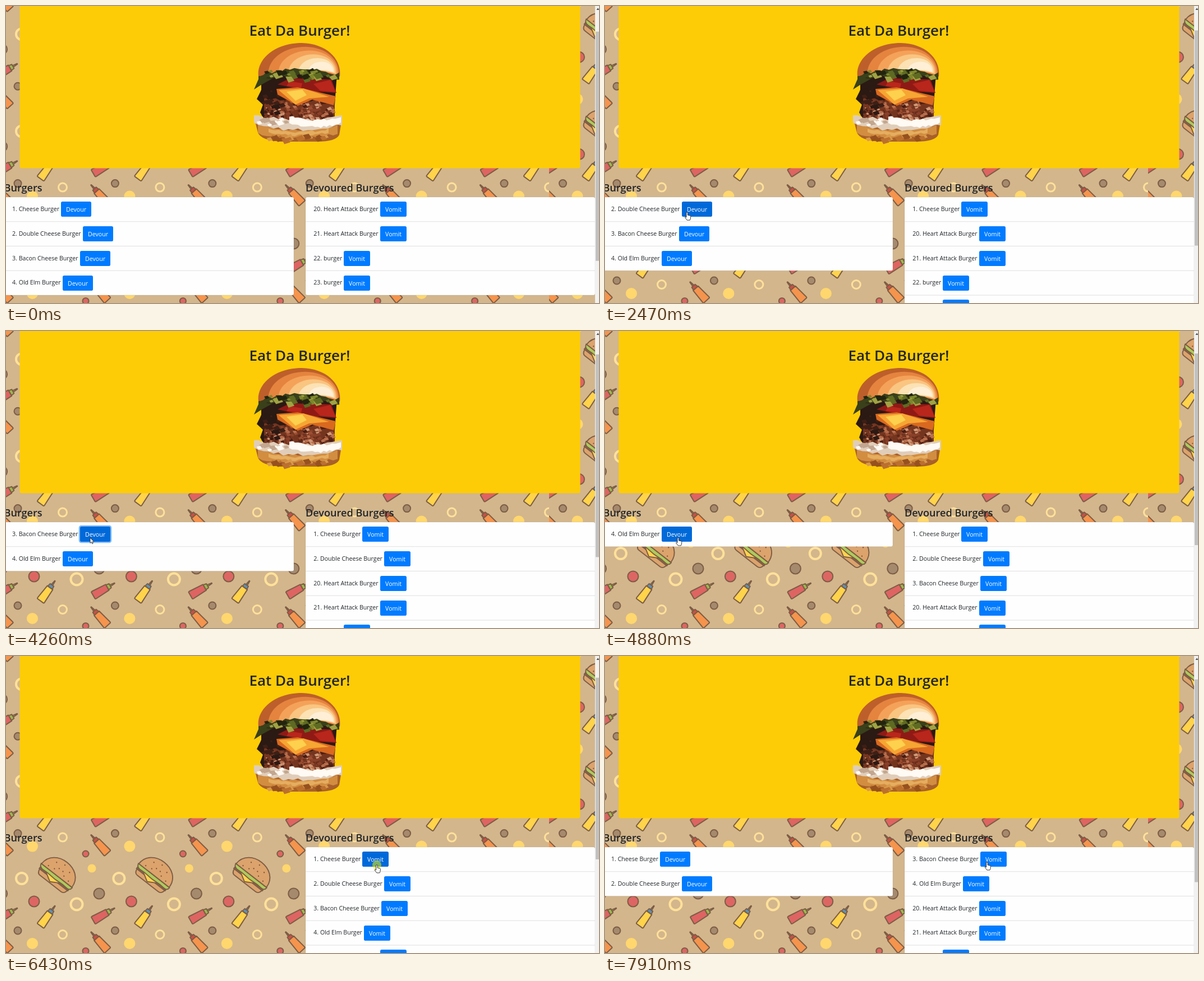
Animation, 1057 px wide and 530 px high, one loop 7.99 s. Source, as an HTML page:

```html
<!DOCTYPE html>
<html lang="en">
<head>
<meta charset="utf-8">
<title>Eat Da Burger!</title>
<style>
html, body { margin: 0; width: 100%; height: 100%; overflow: hidden; background: #d3b68c; }
svg { display: block; }
text { font: 10.6px "Open Sans", "Noto Sans", sans-serif; fill: #212529; }
.title { font-size: 26px; font-weight: 600; text-anchor: middle; }
.heading { font-size: 18.1px; font-weight: 600; }
.label { fill: #fff; text-anchor: middle; }
.ink { stroke: #7c5d45; stroke-width: 2; stroke-linejoin: round; }
.list { fill: #fefefe; stroke: #000; stroke-opacity: .125; stroke-width: .7; }
.rule { stroke: #dfdfdf; }
</style>
</head>
<body>
<svg width="1057" height="530" viewBox="0 0 1057 530">
  <defs>
    <clipPath id="before"><path d="M0 0H968V530H0Z"/></clipPath>
    <clipPath id="after"><path d="M968 0H1057V530H968Z"/></clipPath>
    <g id="tile"></g>
    <g id="wall"></g>
  </defs>
  <g clip-path="url(#before)"><use href="#wall"/></g>
  <g clip-path="url(#after)"><use href="#wall" x="971.5"/></g>

  <rect x="24.5" y="-9" width="999" height="298.5" rx="3.5" fill="#fdcc06"/>
  <text class="title" x="523.5" y="53">Eat Da Burger!</text>
  <g id="hero"></g>

  <text class="heading" x="-3.5" y="331">Burgers</text>
  <text class="heading" x="534" y="331">Devoured Burgers</text>
  <g id="lists"></g>

  <path fill="#f1f1f1" d="M1050 0H1057V530H1050Z"/>
  <path fill="#505050" d="M1052.5 7L1055 3.5 1057.500 7Z"/>
  <rect id="thumb" x="1051" width="6" fill="#c1c1c1"/>

  <g id="pointer">
    <circle id="press" r="8" fill="#e8f000" opacity=".55"/>
    <path id="arrow" fill="#fff" stroke="#222" stroke-width=".8" d="M0 0V9.5L2.2 7.5 3.7 10.8 5.2 10.1 3.8 7H6.8Z"/>
    <path id="hand" fill="#fff" stroke="#222" stroke-width=".9" d="M-1.4 7V1a1.3 1.3 0 0 1 2.6 0V5l4 .9q1.400.4 1.300 1.800l-.6 4-1 2.300h-5l-4-5.200q.5-1.800 2.700.2Z"/>
  </g>
</svg>
<script>
const $ = id => document.getElementById(id);
const LOOP = 7990, STEP = 80, TILE = 173.4;
const repeat = (n, draw) => Array.from({ length: n }, (_, i) => draw(i)).join('');

let seed = 7;
const random = (from, to) => from + (to - from) * (seed = seed * 16807 % 2147483647) / 2147483647;

// Wallpaper
const disc = (x, y, r, fill, ink = '') => `<circle cx="${x}" cy="${y}" r="${r}" fill="${fill}" class="${ink}"/>`;
const ring = (x, y, r, w) => `<circle cx="${x}" cy="${y}" r="${r}" fill="none" stroke="#ffe19a" stroke-width="${w}"/>`;
const bottle = (x, y, angle, body, cap) => `<g class="ink" transform="translate(${x} ${y}) rotate(${angle})">
  <path fill="${cap}" d="M-1.500 -17L-.5 -26H.5L1.500 -17ZM-5 -11L-4 -17H4L5 -11Z"/>
  <path fill="${body}" d="M-6 -11H6L7.500 16Q7.500 18 6 18H-6Q-7.500 18 -7.500 16Z"/></g>`;
const sesame = repeat(9, i => {
  const angle = Math.PI * (i + .5) / 9, r = i % 2 ? 13 : 24;
  return disc(-r * Math.cos(angle), -r * Math.sin(angle), 1.2, '#80553a');
});
const snack = `<g transform="translate(91 391) rotate(38) scale(.95)"><g class="ink">
  <path fill="#dca36c" d="M-33 10H33Q32 20 25 20H-25Q-32 20 -33 10Z"/>
  <path fill="#8d6048" d="M-34 6H34V11H-34Z"/>
  <path fill="#ffd34e" d="M-22 7H16L-3 18Z"/>
  <path fill="#aecb5b" d="M-37 1H37Q37 9 28 8T10 8 -8 8 -26 8 -37 1Z"/>
  <path fill="#dca36c" d="M-36 1C-36 -41 36 -41 36 1Z"/></g>${sesame}</g>`;

$('tile').innerHTML = snack +
  disc(142, 353, 5.5, '#dd6663', 'ink') + disc(153, 379, 7.5, '#ffd76e') + ring(28, 397, 10, 4) +
  disc(166, 424, 9.5, '#a58a6e', 'ink') + disc(50, 438, 9.5, '#dd6663', 'ink') + ring(126, 443, 10.5, 4) +
  bottle(171, 463, 60, '#de6462', '#9cba4d') + bottle(72, 467, 36, '#ffd34a', '#5b93b9') +
  disc(21, 490, 6.5, '#a58a6e', 'ink') + ring(101, 497, 7.5, 3) + disc(47, 513, 10, '#ffd76e') +
  bottle(169, 512, -42, '#f5944d', '#cf4f47');
$('wall').innerHTML = repeat(35, i =>
  `<use href="#tile" x="${(i % 7 - 1) * TILE}" y="${(Math.floor(i / 7) - 3) * TILE}"/>`);

// Large burger, built from ragged bands and random flecks
function band(left, right, top, bottom, bow, rough, fill) {
  const n = 18;
  const edge = y => i => `${left + (right - left) * i / n} ${y + bow * Math.sin(Math.PI * i / n) + random(-rough, rough)}`;
  const indexes = [...Array(n + 1).keys()];
  return `<path fill="${fill}" d="M${[...indexes.map(edge(top)), ...indexes.reverse().map(edge(bottom))].join('L')}Z"/>`;
}
const flecks = (count, left, right, top, bottom, size, tones) => repeat(count, i => {
  const s = random(size / 3, size);
  return `<path fill="${tones[i % tones.length]}" d="M${random(left, right)} ${random(top, bottom)}l${s} ${-s * random(0, .5)} ${s * .5} ${s * .7} ${-s} ${s * .3}Z"/>`;
});
const bun = ['#bd5f2a', '#e5843f', '#f4a25a', '#f9c581', '#fce2b4', '#feefd6'].map((fill, i) => {
  const scale = 1 - i * .14;
  return `<path fill="${fill}" transform="translate(578 114) scale(${scale}) translate(-578 -114)"
    d="M450 126C446 96 478 66 527 66C575 67 599 98 595 126Q520 102 450 126Z"/>`;
}).join('');

$('hero').innerHTML =
  '<path fill="#2b1913" d="M455 120H590L584 204 462 204 453 190 458 176 447 166 455 150Z"/>' +
  bun +
  band(460, 586, 164, 202, 5, 3, '#74351f') +
  flecks(150, 462, 578, 168, 200, 7, ['#9b4e32', '#4a1d13', '#b86e4c', '#5a2616', '#8a4029', '#d09a78']) +
  flecks(30, 454, 486, 145, 195, 9, ['#2b1913', '#3d1f15']) +
  '<path fill="#8f1a15" d="M484 140L506 129 580 131 589 155 540 152Z"/>' +
  '<path fill="#b9261b" d="M548 139L578 132 588 154 560 151ZM505 134L528 138 526 146 500 143Z"/>' +
  '<path fill="#d9691f" d="M482 148L520 145 588 161 584 177 546 167 520 178 484 158Z"/>' +
  '<path fill="#f6a633" d="M486 150L530 147 576 162 540 165 516 176Z"/>' +
  '<path fill="#fdd04d" d="M500 153L528 149 536 159 516 169Z"/>' +
  '<path fill="#39401a" d="M442 149L452 126 474 130 456 140Z"/>' +
  band(450, 594, 122, 132, -8, 4, '#39401a') +
  flecks(28, 456, 580, 115, 128, 13, ['#7f872c', '#23240f', '#a0a243', '#5f6a22']) +
  '<path fill="#a9602a" d="M444 206H598L594 230Q588 242 555 242H490Q455 240 449 226Z"/>' +
  band(449, 591, 214, 228, 7, 2, '#d28d40') +
  band(468, 575, 220, 226, 5, 2, '#e5ad5f') +
  flecks(16, 460, 570, 230, 237, 14, ['#bb702f', '#96511f', '#d99a4c']) +
  band(442, 599, 194, 211, 10, 3, '#e0cdb9') +
  band(505, 597, 197, 209, 7, 2, '#fffaf3') +
  flecks(14, 444, 500, 200, 214, 10, ['#fffaf3', '#c3a68f']);

// Menu
const menu = new Map([[1, 'Cheese Burger'], [2, 'Double Cheese Burger'], [3, 'Bacon Cheese Burger'], [4, 'Old Elm Burger'],
  [20, 'Heart Attack Burger'], [21, 'Heart Attack Burger'], [22, 'burger'], [23, 'burger']]);
const columns = [
  { x: -3, textX: 11, label: 'Devour', width: 54 },
  { x: 534, textX: 548.3, label: 'Vomit', width: 47 },
];
const ruler = document.createElement('canvas').getContext('2d');
ruler.font = getComputedStyle(document.querySelector('text:not([class])') || $('lists').appendChild(
  document.createElementNS('http://www.w3.org/2000/svg', 'text'))).font;
const caption = id => `${id}. ${menu.get(id)}`;
const rowTop = i => 341 + 43.75 * i;
const buttonX = (column, id) => Math.round(column.textX + ruler.measureText(caption(id)).width + 3);

// Pointer moves; those with an id click the burger in the first row, which moves on reload
const visits = [
  { from: 270, to: 430, x: 527, y: 404 },
  { from: 590, to: 750, x: 195, y: 357 },
  { from: 970, to: 1530, x: 117, y: 369, click: 1750, reload: 2080, id: 1 },
  { from: 2160, to: 2630, x: 153, y: 368, click: 2720, reload: 2960, id: 2 },
  { from: 3570, to: 3730, x: 150, y: 369, click: 3820, reload: 4340, id: 3 },
  { from: 4420, to: 5040, x: 128, y: 369, click: 5120, reload: 5350, id: 4 },
  { from: 5350, to: 5510, x: 588, y: 402 },
  { from: 5720, to: 6280, x: 661, y: 373, click: 6430, reload: 6900, id: 1 },
  { from: 7030, to: 7440, x: 681, y: 368, click: 7580, reload: 7830, id: 2 },
];

function pointerAt(t) {
  let x = 825, y = 467;
  for (const visit of visits) {
    if (t < visit.from) break;
    const steps = Math.round((visit.to - visit.from) / STEP) + 1;
    const p = Math.min(1, (Math.floor((t - visit.from) / STEP) + 1) / steps);
    const eased = 1 - (1 - p) ** 2;
    x += (visit.x - x) * eased;
    y += (visit.y - y) * eased;
  }
  return { x, y };
}

function splitMenu(t) {
  const uneaten = new Set([1, 2, 3, 4]);
  for (const { id, reload } of visits)
    if (t >= reload && !uneaten.delete(id)) uneaten.add(id);
  const ids = [...menu.keys()];
  return [ids.filter(id => uneaten.has(id)), ids.filter(id => !uneaten.has(id))];
}

function list(column, ids, hover, focus) {
  const { x, textX, label, width } = column;
  if (!ids.length) return '';
  return `<rect class="list" x="${x}" y="341" width="516" height="${rowTop(ids.length) - 341}" rx="3"/>` + ids.map((id, i) => {
    const y = rowTop(i), left = buttonX(column, id), top = Math.round(y + 8.3), hot = hover && !i;
    const box = grow => `x="${left - grow}" y="${top - grow}" width="${width + 2 * grow}" height="${27 + 2 * grow}"`;
    return (i ? `<path class="rule" d="M${x} ${y}h516"/>` : '') +
      `<text x="${textX}" y="${y + 25}">${caption(id)}</text>` +
      (hot && focus ? `<rect ${box(2.3)} rx="4.5" fill="#80bdff"/>` : '') +
      `<rect ${box(0)} rx="2.8" fill="${hot ? '#0069d9' : '#007bff'}"/>` +
      `<text class="label" x="${left + width / 2}" y="${top + 18}">${label}</text>`;
  }).join('');
}

const show = (id, on) => $(id).style.display = on ? '' : 'none';
let drawn = '';

function draw(t) {
  const { x, y } = pointerAt(t), lists = splitMenu(t);
  const visit = visits.filter(v => t >= v.from).pop() || {};
  const over = columns.findIndex((column, i) => {
    const dx = lists[i].length ? x - buttonX(column, lists[i][0]) : -1;
    return dx >= 0 && dx < column.width && y > 349 && y < 376;
  });
  const hover = t < visit.reload ? over : -1;
  const focus = t >= visit.click + 2 * STEP;
  const loading = t >= visit.reload - 2 * STEP && t < visit.reload + STEP;

  $('pointer').setAttribute('transform', `translate(${x} ${y})`);
  show('pointer', t >= visits[0].from);
  show('hand', over >= 0 && !loading);
  show('arrow', over < 0 || loading);
  show('press', t >= visit.click && t < visit.click + 2 * STEP);

  const key = [lists[0], hover, focus].join('|');
  if (key === drawn) return;
  drawn = key;
  $('lists').innerHTML = columns.map((column, i) => list(column, lists[i], hover === i, focus)).join('');
  // The thumb shrinks as the page grows
  const height = 6250 / (lists[1].length + 11.28);
  $('thumb').setAttribute('y', 12 + height * .0824);
  $('thumb').setAttribute('height', height);
}

function frame() {
  draw(performance.now() % LOOP);
  requestAnimationFrame(frame);
}
frame();
</script>
</body>
</html>
```
